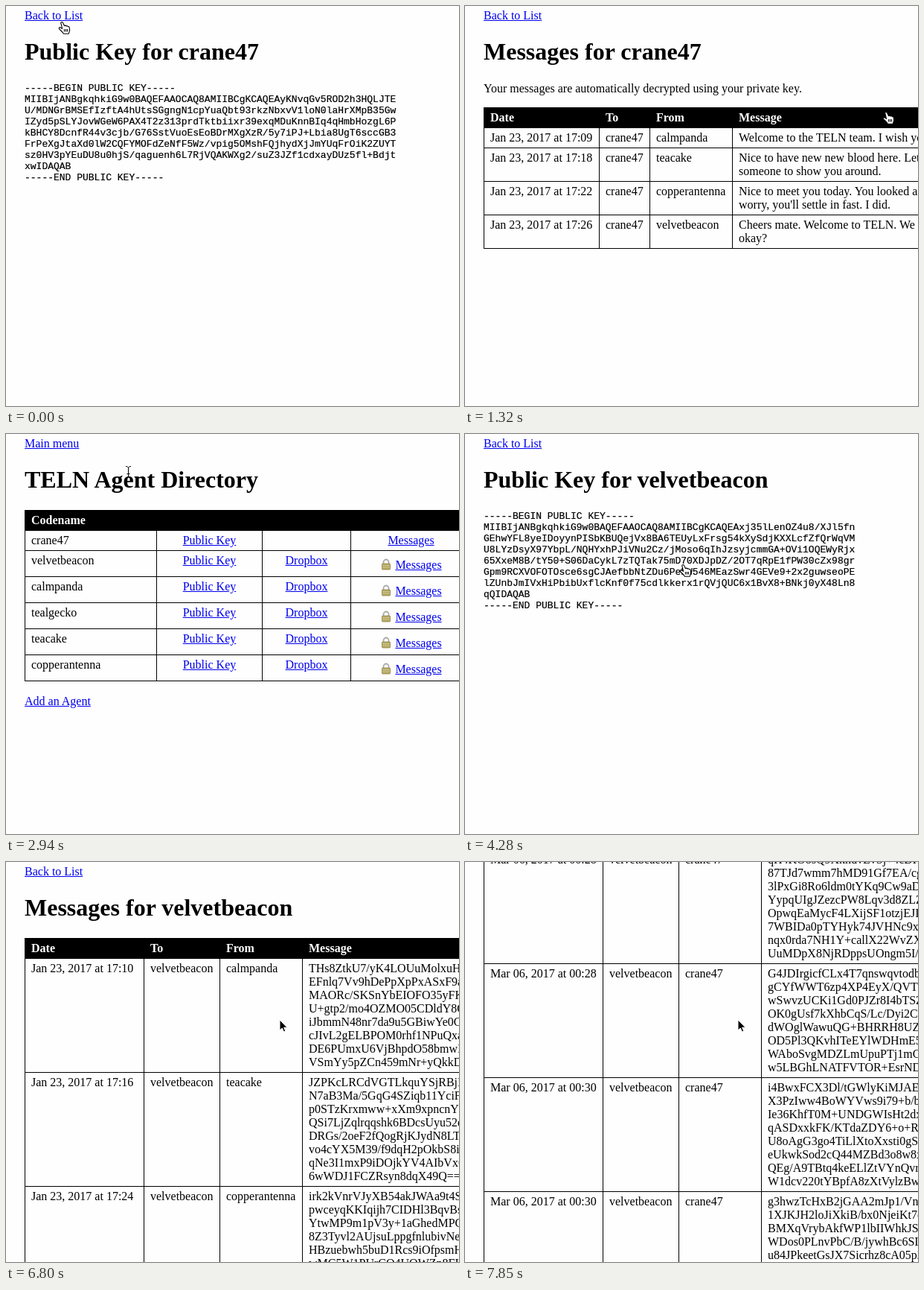
An HTML page for the animation above (7990 ms loop, 609 px wide and 537 px high).

```html
<!DOCTYPE html>
<html lang="en">
<head>
<meta charset="utf-8">
<title>Agent directory</title>
<style>
  html, body { margin: 0; height: 100%; overflow: hidden; background: #fefefe; }
  #stage { position: relative; width: 609px; height: 537px; overflow: hidden;
    font: 16px/18px "Liberation Serif", Times, serif; color: #000; }
  .page { position: absolute; left: 25px; top: 4px; width: 900px; visibility: hidden; }
  .page > a { display: block; width: max-content; }
  a { color: #00e; text-decoration: underline; }
  h1 { margin: 21px 0 22px; font: bold 32px/37px "Liberation Serif", Times, serif; white-space: nowrap; }
  p { margin: 0 0 16px; }
  pre { margin: 0; padding-top: 1px; font: 13px/15px "Liberation Mono", "Courier New", monospace;
    -webkit-text-stroke: .2px #000; }
  .grid { display: grid; width: max-content; border: solid #000; border-width: 1px 0 0 1px; margin-bottom: 18px; }
  .grid > div { padding: 4px 8px; border: solid #000; border-width: 0 1px 1px 0; white-space: pre; overflow: hidden; }
  .grid > .head { background: #000; color: #fff; font-weight: bold; }
  .grid > .mid { text-align: center; }
  .grid > .locked { padding: 10px 8px 6px; }
  .lock { width: 16px; height: 16px; vertical-align: -2px; }
  #cursors > g { visibility: hidden; }
  #cursors { position: absolute; left: 0; top: 0; }
</style>
</head>
<body>
<div id="stage">
  <svg id="cursors" width="609" height="537">
    <g id="arrow" fill="#000" stroke="#fff">
      <path d="M0 0V14L3.3 11L5.5 16L7.8 15L5.6 10.2H10Z"/>
    </g>
    <g id="hand" fill="#fff" stroke="#000" stroke-width="1.1" stroke-linejoin="round">
      <path d="M-1.3 1.6C-1 .1 1 .2 1.6 1.6L3.4 5.6C4.2 4.8 5.4 5 6 6C6.8 5.3 7.9 5.6 8.3 6.6C9.3 6.2 10 6.8 10.2 7.8L10.6 11C10.7 12.8 9.8 13.6 9.3 16.2H2.2C1.4 13.6-1.6 12-3.6 9.6C-4.4 8.2-2.8 7-1.4 8.2L.6 9.4Z"/>
      <path d="M3.4 10V13.5M5.5 10V13.5M7.5 10V13.5" fill="none"/>
    </g>
    <g id="beam" fill="none" stroke="#000">
      <path d="M-3 -6.5H-1.5L.5 -5L2.5 -6.5H4M.5 -5V7M-3 8.5H-1.5L.5 7L2.5 8.5H4M-1.5 3.5H2.5"/>
    </g>
  </svg>
</div>
<script>
const STEP = 148, LEAD = 20, LOOP = 7990, LAST = 53;
const stage = document.getElementById('stage'), cursors = document.getElementById('cursors');

const ME = 'crane47', PEER = 'velvetbeacon';
const keys = {
  [ME]: `MIIBIjANBgkqhkiG9w0BAQEFAAOCAQ8AMIIBCgKCAQEAyKNvqGv5ROD2h3HQLJTE
U/MDNGrBMSEfIzftA4hUtsSGgngN1cpYuaQbt93rkzNbxvV1loN0laHrXMpB35Gw
IZyd5pSLYJovWGeW6PAX4T2z313prdTktbiixr39exqMDuKnnBIq4qHmbHozgL6P
kBHCY8DcnfR44v3cjb/G76SstVuoEsEoBDrMXgXzR/5y7iPJ+Lbia8UgT6sccGB3
FrPeXgJtaXd0lW2CQFYMOFdZeNfF5Wz/vpig5OMshFQjhydXjJmYUqFrOiK2ZUYT
sz0HV3pYEuDU8u0hjS/qaguenh6L7RjVQAKWXg2/suZ3JZf1cdxayDUz5fl+Bdjt
xwIDAQAB`,
  [PEER]: `MIIBIjANBgkqhkiG9w0BAQEFAAOCAQ8AMIIBCgKCAQEAxj35lLenOZ4u8/XJl5fn
GEhwYFL8yeIDoyynPISbKBUQejVx8BA6TEUyLxFrsg54kXySdjKXXLcfZfQrWqVM
U8LYzDsyX97YbpL/NQHYxhPJiVNu2Cz/jMoso6qIhJzsyjcmmGA+OVi1OQEWyRjx
65XxeM8B/tY50+S06DaCykL7zTQTak75mD70XDJpDZ/2OT7qRpE1fPW30cZx98gr
Gpm9RCXVOFOTOsce6sgCJAefbbNtZDu6PeNW546MEazSwr4GEVe9+2x2guwseoPE
lZUnbJmIVxHiPbibUxflcKnf0f75cdlkkerx1rQVjQUC6x1BvX8+BNkj0yX48Ln8
qQIDAQAB`
};

// Sender, date and the visible start of each encrypted line
const encrypted = [
  ['calmpanda', 'Jan 23, 2017 at 17:10', 'THs8ZtkU7/yK4LOUuMolxuH EFnlq7Vv9hDePpXpPxASxF9a MAORc/SKSnYbEIOFO35yFK U+gtp2/mo4OZMO05CDldY8C iJbmmN48nr7da9u5GBiwYe0C cJIvL2gELBPOM0rhf1NPuQxa DE6PUmxU6VjBhpdO58bmwI VSmYy5pZCn459mNr+yQkkD'],
  ['teacake', 'Jan 23, 2017 at 17:16', 'JZPKcLRCdVGTLkquYSjRBjI N7aB3Ma/5GqG4SZiqb11YciF p0STzKrxmww+xXm9xpncnY QSi7LjZqlrqqshk6BDcsUyu52e DRGs/2oeF2fQogRjKJydN8LT vo4cYX5M39/f9dqH2pOkbS8i qNe3I1mxP9iDOjkYV4AIbVx 6wWDJ1FCZRsyn8dqX49Q=='],
  ['copperantenna', 'Jan 23, 2017 at 17:24', 'irk2kVnrVJyXB54akJWAa9t4S pwceyqKKIqijh7CIDHl3BqvBs YtwMP9m1pV3y+1aGhedMPC 8Z3Tyvl2AUjsuLppgfnlubivNe HBzuebwh5buD1Rcs9iOfpsmH wMC5W1PUrCO4UOWZn8FI'],
  [ME, 'Mar 06, 2017 at 00:28', 'qH4KO8sQ9XkhdvLvSj+4cDH 87TJd7wmm7hMD91Gf7EA/c 3lPxGi8Ro6ldm0tYKq9Cw9aD YypqUIgJZezcPW8Lqv3d8ZLZ OpwqEaMycF4LXijSF1otzjEJI 7WBIDa0pTYHyk74JVHNc9x nqx0rda7NH1Y+callX22WvZX UuMDpX8NjRDppsUOngm5I/'],
  [ME, 'Mar 06, 2017 at 00:28', 'G4JDIrgicfCLx4T7qnswqvtodb gCYfWWT6zp4XP4EyX/QVT wSwvzUCKi1Gd0PJZr8I4bTS OK0gUsf7kXhbCqS/Lc/Dyi2C dWOglWawuQG+BHRRH8UZ OD5Pl3QKvhITeEYlWDHmE5 WAboSvgMDZLmUpuPTj1mC w5LBGhLNATFVTOR+EsrND'],
  [ME, 'Mar 06, 2017 at 00:30', 'i4BwxFCX3Dl/tGWlyKiMJAE X3PzIww4BoWYVws9i79+b/b Ie36KhfT0M+UNDGWIsHt2dx qASDxxkFK/KTdaZDY6+o+R U8oAgG3go4TiLlXtoXxsti0gS eUkwkSod2cQ44MZBd3o8w8x QEg/A9TBtq4keELlZtVYnQvr W1dcv220tYBpfA8zXtVylzBw'],
  [ME, 'Mar 06, 2017 at 00:30', 'g3hwzTcHxB2jGAA2mJp1/Vn 1XJKJH2loJiXkiB/bx0NjeiKt7c BMXqVrybAkfWP1lbIIWhkJS WDos0PLnvPbC/B/jywhBc6SI u84JPkeetGsJX7Sicrhz8cA05p']
];

const plain = [
  ['Jan 23, 2017 at 17:09', 'calmpanda', 'Welcome to the TELN team. I wish you all the best.'],
  ['Jan 23, 2017 at 17:18', 'teacake', 'Nice to have new new blood here. Let me find\nsomeone to show you around.'],
  ['Jan 23, 2017 at 17:22', 'copperantenna', "Nice to meet you today. You looked a bit lost. Don't\nworry, you'll settle in fast. I did."],
  ['Jan 23, 2017 at 17:26', PEER, 'Cheers mate. Welcome to TELN. We should have lunch,\nokay?']
];

let seed = 7;
function randomText(length) {
  const chars = 'ABCDEFGHIJKLMNOPQRSTUVWXYZabcdefghijklmnopqrstuvwxyz0123456789+/';
  let text = '';
  while (text.length < length) {
    seed = (seed * 16807) % 2147483647;
    text += chars[seed % 64];
  }
  return text;
}

function cipher(starts) {
  const lines = starts.split(' ');
  return Array.from({ length: 8 }, (_, i) => {
    const line = lines[i] || '';
    return line.endsWith('=') ? line : line + randomText(44 - line.length);
  }).join('\n');
}

const link = text => `<a>${text}</a>`;
const cell = (text, type = '') => `<div class="${type}">${text}</div>`;
const grid = (widths, heads, cells) =>
  `<div class="grid" style="grid-template-columns:${widths.map(w => w + 'px').join(' ')}">` +
  heads.map(h => cell(h, 'head')).join('') + cells.join('') + '</div>';

function addPage(back, title, body) {
  const page = document.createElement('div');
  page.className = 'page';
  page.innerHTML = link(back) + `<h1>${title}</h1>` + body;
  stage.insertBefore(page, cursors);
  return page;
}

const keyPage = name => addPage('Back to List', 'Public Key for ' + name,
  `<pre>-----BEGIN PUBLIC KEY-----\n${keys[name]}\n-----END PUBLIC KEY-----</pre>`);

const messagePage = (name, intro, widths, rows) => addPage('Back to List', 'Messages for ' + name,
  intro + grid(widths, ['Date', 'To', 'From', 'Message'],
    rows.flatMap(([date, from, text]) => [date, name, from, text].map(t => cell(t)))));

const lock = `<svg class="lock" viewBox="0 0 16 16">
  <path d="M4.5 8V5a3.5 3.5 0 0 1 7 0V8" fill="none" stroke="#aaa" stroke-width="1.8"/>
  <rect x="2.5" y="7" width="11" height="8" rx="1" fill="#b5a964" stroke="#8d8348" stroke-width=".8"/>
  <path d="M3 9.5H13M3 12H13" stroke="#cdc48d"/></svg>`;

const names = [ME, PEER, 'calmpanda', 'tealgecko', 'teacake', 'copperantenna'];
const directory = addPage('Main menu', 'TELN Agent Directory',
  grid([177, 142, 119, 162], ['Codename', '', '', ''], names.flatMap(name => [
    cell(name),
    cell(link('Public Key'), 'mid'),
    cell(name === ME ? '' : link('Dropbox'), 'mid'),
    name === ME ? cell(link('Messages'), 'mid') : cell(lock + ' ' + link('Messages'), 'mid locked')
  ])) + link('Add an Agent'));

const myKey = keyPage(ME), peerKey = keyPage(PEER);
const myMessages = messagePage(ME, '<p>Your messages are automatically decrypted using your private key.</p>',
  [155, 68, 111, 420], plain);
const peerMessages = messagePage(PEER, '', [160, 102, 111, 420],
  encrypted.map(([from, date, starts]) => [date, from, cipher(starts)]));

const visits = [[0, myKey], [1, directory], [9, myMessages], [18, directory],
  [29, peerKey], [35, directory], [45, peerMessages]];
const scrolls = [[0, 0], [47, 120], [48, 300], [50, 605]];
const path = [
  [0, 75, 21, 'hand'], [1, 75, 21, 'arrow'], [6, 558, 140, 'hand'], [7, 566, 142, 'hand'],
  [9, 566, 142, 'hand'], [10, 545, 135, 'arrow'], [15, 68, 16, 'hand'], [18, 76, 20, 'hand'],
  [19, 100, 28, 'arrow'], [20, 164, 50, 'beam'], [21, 255, 90, 'arrow'], [23, 528, 208, 'hand'],
  [24, 528, 208, 'hand'], [25, 410, 191, 'arrow'], [26, 293, 175, 'hand'], [30, 293, 175, 'hand'],
  [31, 262, 150, 'arrow'], [34, 68, 16, 'hand'], [35, 75, 20, 'arrow'], [36, 122, 38, 'arrow'],
  [38, 285, 100, 'arrow'], [43, 533, 172, 'hand'], [45, 533, 172, 'hand'],
  [46, 368, 212, 'arrow'], [52, 368, 212, 'arrow'], [53, 367, 212, 'arrow']
];

const indexAt = (list, step) => list.findLastIndex(entry => entry[0] <= step);

function draw(now) {
  const step = Math.min(LAST, Math.floor((now % LOOP + LEAD) / STEP));

  const current = visits[indexAt(visits, step)][1];
  for (const page of stage.querySelectorAll('.page'))
    page.style.visibility = page === current ? 'visible' : 'hidden';
  peerMessages.style.top = 4 - scrolls[indexAt(scrolls, step)][1] + 'px';

  const i = indexAt(path, step), [k0, x0, y0, type] = path[i], [k1, x1, y1] = path[i + 1] || [k0 + 1, x0, y0];
  const u = (step - k0) / (k1 - k0), ease = u * u * (3 - 2 * u);
  const x = Math.round(x0 + (x1 - x0) * ease), y = Math.round(y0 + (y1 - y0) * ease);
  for (const g of cursors.children) {
    g.style.visibility = g.id === type ? 'visible' : 'hidden';
    g.setAttribute('transform', `translate(${x} ${y})`);
  }
}

let start;
function tick(now) {
  start ??= now;
  draw(now - start);
  requestAnimationFrame(tick);
}
requestAnimationFrame(tick);
</script>
</body>
</html>
```
